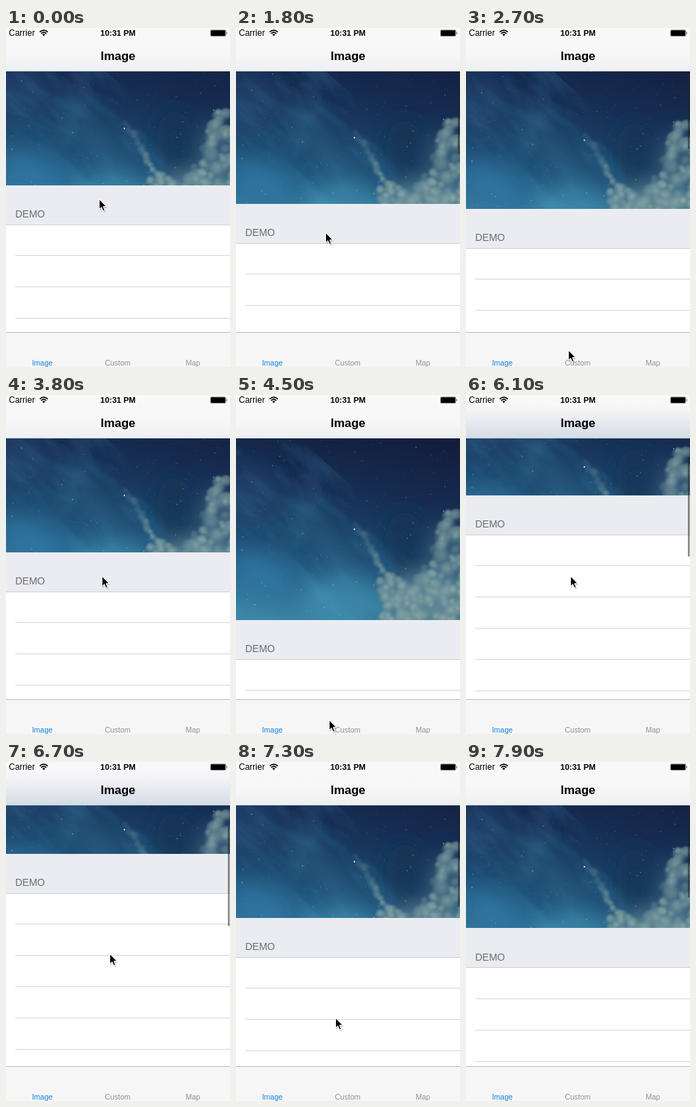
Recreate the animation shown at these times as an HTML page. Size 316 by 476 pixels, loop 8 s.

```html
<!DOCTYPE html>
<html lang="en">
<head>
<meta charset="utf-8">
<title>Parallax header</title>
<style>
html, body { margin: 0; width: 100%; height: 100%; overflow: hidden; background: #fff; }
svg { display: block; width: 100vw; height: 100vh; font-family: "Liberation Sans", Arial, sans-serif; }
</style>
</head>
<body>
<svg viewBox="0 0 316 476">
  <defs>
    <linearGradient id="night" x1="0.62" y1="0" x2="0.38" y2="1">
      <stop offset="0" stop-color="#121d3d"/>
      <stop offset=".3" stop-color="#162d52"/>
      <stop offset=".55" stop-color="#1b4267"/>
      <stop offset=".78" stop-color="#255f87"/>
      <stop offset="1" stop-color="#3b85a8"/>
    </linearGradient>
    <radialGradient id="puff" cx=".45" cy=".35" r=".6">
      <stop offset="0" stop-color="#a3b7b1"/>
      <stop offset=".5" stop-color="#70939a"/>
      <stop offset="1" stop-color="#3f6d80" stop-opacity="0"/>
    </radialGradient>
    <linearGradient id="bar" x1="0" y1="0" x2="0" y2="1">
      <stop offset="0" stop-color="#f9f9fa"/>
      <stop offset=".6" stop-color="#f7f7f8"/>
      <stop offset="1" stop-color="#eeeff2"/>
    </linearGradient>
    <linearGradient id="tint" x1="0" y1="0" x2="0" y2="1">
      <stop offset=".2" stop-color="#b9cad8" stop-opacity="0"/>
      <stop offset="1" stop-color="#b9cad8" stop-opacity=".5"/>
    </linearGradient>
    <filter id="haze" x="-80%" y="-80%" width="260%" height="260%"><feGaussianBlur stdDeviation="14"/></filter>
    <filter id="soft" x="-20%" y="-20%" width="140%" height="140%"><feGaussianBlur stdDeviation=".8"/></filter>
    <filter id="nebula" x="0" y="0" width="100%" height="100%" color-interpolation-filters="sRGB">
      <feTurbulence type="fractalNoise" baseFrequency=".012 .03" numOctaves="4" seed="8"/>
      <feColorMatrix values="0 0 0 0 .3  0 0 0 0 .62  0 0 0 0 .78  2.4 0 0 0 -1.05"/>
    </filter>
    <clipPath id="window"><rect id="windowRect" y="61" width="316"/></clipPath>
  </defs>

  <rect width="316" height="476" fill="#fff"/>
  <g clip-path="url(#window)">
    <g id="sky">
      <rect y="-140" width="316" height="280" fill="url(#night)"/>
      <g filter="url(#haze)">
        <ellipse cx="20" cy="-50" rx="40" ry="45" fill="#25527b" opacity=".35"/>
        <ellipse cx="98" cy="-48" rx="24" ry="34" fill="#132a4f" opacity=".5"/>
        <ellipse cx="130" cy="20" rx="75" ry="20" transform="rotate(48 130 20)" fill="#286387" opacity=".5"/>
        <ellipse cx="38" cy="62" rx="48" ry="24" transform="rotate(25 38 62)" fill="#3380ad" opacity=".6"/>
        <ellipse cx="150" cy="100" rx="60" ry="35" fill="#4398b6" opacity=".6"/>
        <ellipse cx="238" cy="18" rx="26" ry="44" fill="#123352" opacity=".7"/>
        <ellipse cx="275" cy="100" rx="60" ry="35" fill="#6f949c" opacity=".8"/>
        <ellipse cx="300" cy="35" rx="20" ry="40" fill="#53788b" opacity=".7"/>
      </g>
      <rect x="-160" y="-130" width="420" height="150" transform="translate(80 40) rotate(42)" filter="url(#nebula)" opacity=".22"/>
      <g id="clouds" filter="url(#soft)"></g>
      <g id="stars" fill="#bcd6e8"></g>
    </g>
  </g>

  <g id="header">
    <rect width="316" height="56" fill="#ebecf1"/>
    <path d="M0 55.500H316" stroke="#d0cfd3"/>
  </g>
  <g id="rows">
    <text x="13" y="45" font-size="14" fill="#6d6d72">DEMO</text>
    <path id="separators" fill="none" stroke="#d6d6d9"/>
  </g>
  <rect id="scroller" x="313" width="2.5" rx="1.25" fill="#222" fill-opacity=".55"/>

  <rect width="316" height="61" fill="url(#bar)"/>
  <rect id="barTint" width="316" height="61" fill="url(#tint)"/>
  <path d="M0 60.500H316" stroke="#b5b9bf" stroke-opacity=".6"/>
  <text x="4" y="11" font-size="12">Carrier</text>
  <g fill="none" stroke="#000" stroke-width="1.6">
    <path d="M47.600 5.700Q53.300 .5 59 5.700M49.600 7.900Q53.300 4.500 57 7.900"/>
    <path d="M53.300 11.400L51.200 9.100Q53.300 7.400 55.400 9.100Z" fill="#000" stroke="none"/>
  </g>
  <text x="158" y="11" font-size="11.5" font-weight="bold" text-anchor="middle">10:31 PM</text>
  <rect x="288.500" y="2.800" width="21.500" height="8.800" rx="1.500" fill="none" stroke="#666" stroke-width=".7"/>
  <rect x="289" y="3.300" width="20.500" height="7.800" rx="1"/>
  <path d="M311 5.200q1.800 2 0 4z"/>
  <text x="158" y="45" font-size="17" font-weight="bold" text-anchor="middle">Image</text>

  <rect y="427" width="316" height="49" fill="#f6f6f6"/>
  <path d="M0 427.500H316" stroke="#bdbdbf"/>
  <g font-size="10.5" fill="#929292" text-anchor="middle">
    <text x="51.3" y="473.5" fill="#1482e8">Image</text>
    <text x="157.5" y="473.5">Custom</text>
    <text x="263.7" y="473.5">Map</text>
  </g>
  <g id="cursor">
    <path d="M1 2V17L4.500 14L7 19L10 18L7.500 13H12Z" fill="#000" opacity=".18"/>
    <path d="M.5 .5V14.500L3.700 11.600L6 16.800L8.300 15.800L6.100 10.700H10.500Z" fill="#000" stroke="#fff" stroke-width="1"/>
  </g>
</svg>
<script>
const LOOP = 8000, STEP = 100, TOP = 61, REST = 160, ROW = 44;
const $ = id => document.getElementById(id);
const clamp = v => Math.min(1, Math.max(0, v));

let seed = 17;
const random = () => (seed = (seed * 16807) % 2147483647) / 2147483647;

function set(node, attrs) {
  for (const key in attrs) node.setAttribute(key, attrs[key]);
}

function add(parent, name, attrs) {
  const node = document.createElementNS('http://www.w3.org/2000/svg', name);
  set(node, attrs);
  $(parent).append(node);
}

// The cloud bank is low on the left and towers up at the right edge.
const cloudTop = x => 70 - 12 * Math.sin((x - 200) / 14) - 90 * clamp((x - 250) / 40);

for (let i = 0; i < 150; i++) {
  const depth = i / 150;
  const x = 204 + random() * 120, top = cloudTop(x), r = 5 + random() * 9;
  add('clouds', 'circle', {
    cx: x, cy: top + r + depth * (130 - top), r,
    fill: 'url(#puff)', opacity: 0.25 + random() * 0.45
  });
}
for (let i = 0; i < 24; i++) {
  const u = i / 23;
  add('clouds', 'circle', {
    cx: 166 + 42 * u + random() * 6, cy: -8 + 70 * u ** 1.2 + random() * 6,
    r: 4 + 3 * random(), fill: 'url(#puff)', opacity: 0.08 + 0.4 * u * u
  });
}

for (let i = 0; i < 210; i++) {
  const x = random() * 316, y = random() * 260 - 130;
  if (x > 200 && y > cloudTop(x)) continue;
  add('stars', 'circle', { cx: x, cy: y, r: 0.35 + random() ** 3 * 0.5, opacity: 0.2 + random() * 0.5 });
}
add('stars', 'circle', { cx: 167, cy: 0, r: 1.2 });

let lines = '';
for (let i = 1; i < 9; i++) lines += `M13 ${54.5 + i * ROW}H316`;
set($('separators'), { d: lines });

// Pointer moves: start, end, target x, y
const moves = [[1300, 1800, 126, 287], [1800, 2450, 144, 452], [2700, 3000, 135, 254],
  [3900, 4500, 131, 456], [4800, 5300, 147, 334], [5700, 6100, 147, 254],
  [6600, 7300, 140, 359], [7300, 7640, 140, 482]];

// Drags: grab time, release time, pointer y at which the table is at rest
const drags = [[1300, 2500, 239.5], [3900, 4600, 254], [5700, 6100, 334], [6600, 7640, 361]];

function pointer(t) {
  let x = 131, y = 240;
  for (const [from, to, toX, toY] of moves) {
    const u = clamp((t - from) / (to - from));
    x += (toX - x) * u;
    y += (toY - y) * u;
  }
  return { x, y };
}

// Past the top the table resists the pull.
const rubberBand = d => d < 0 ? d : 0.58 * d / (1 + 0.58 * d / 512);

// A pulled table springs back; a flicked one coasts on.
function settle(offset, ms) {
  const u = ms * 0.0114;
  return offset > 0 ? offset * (1 + u) * Math.exp(-u) : offset - 27 * (1 - Math.exp(-u));
}

function pull(t) {
  const drag = drags.findLast(([grab]) => grab <= t);
  if (!drag) return 0;
  const [, release, base] = drag;
  const offset = rubberBand(pointer(Math.min(t, release)).y - base);
  return t > release ? settle(offset, t - release) : offset;
}

const scrollerAlpha = t => Math.max(...drags.map(([grab, release]) =>
  clamp((t - grab) / 100) * clamp((release + 1000 - t) / 300)));

function render(t) {
  const offset = pull(t), height = REST + Math.floor(offset + 0.01);
  const scrolled = Math.max(0, -offset), { x, y } = pointer(t);
  set($('windowRect'), { height });
  set($('sky'), { transform: `translate(0 ${TOP + height / 2})` });
  set($('header'), { transform: `translate(0 ${TOP + height})` });
  set($('rows'), { transform: `translate(0 ${TOP + REST + Math.round(offset)})` });
  set($('scroller'), {
    y: 63 + scrolled * 0.3,
    height: 140 - Math.max(0, offset),
    opacity: scrollerAlpha(t)
  });
  set($('barTint'), { opacity: clamp(scrolled / 80) });
  set($('cursor'), { transform: `translate(${x} ${y})` });
}

const start = performance.now();
function frame() {
  const elapsed = (performance.now() - start) % LOOP;
  render(Math.floor(elapsed / STEP) * STEP);
  requestAnimationFrame(frame);
}
frame();
</script>
</body>
</html>
```
